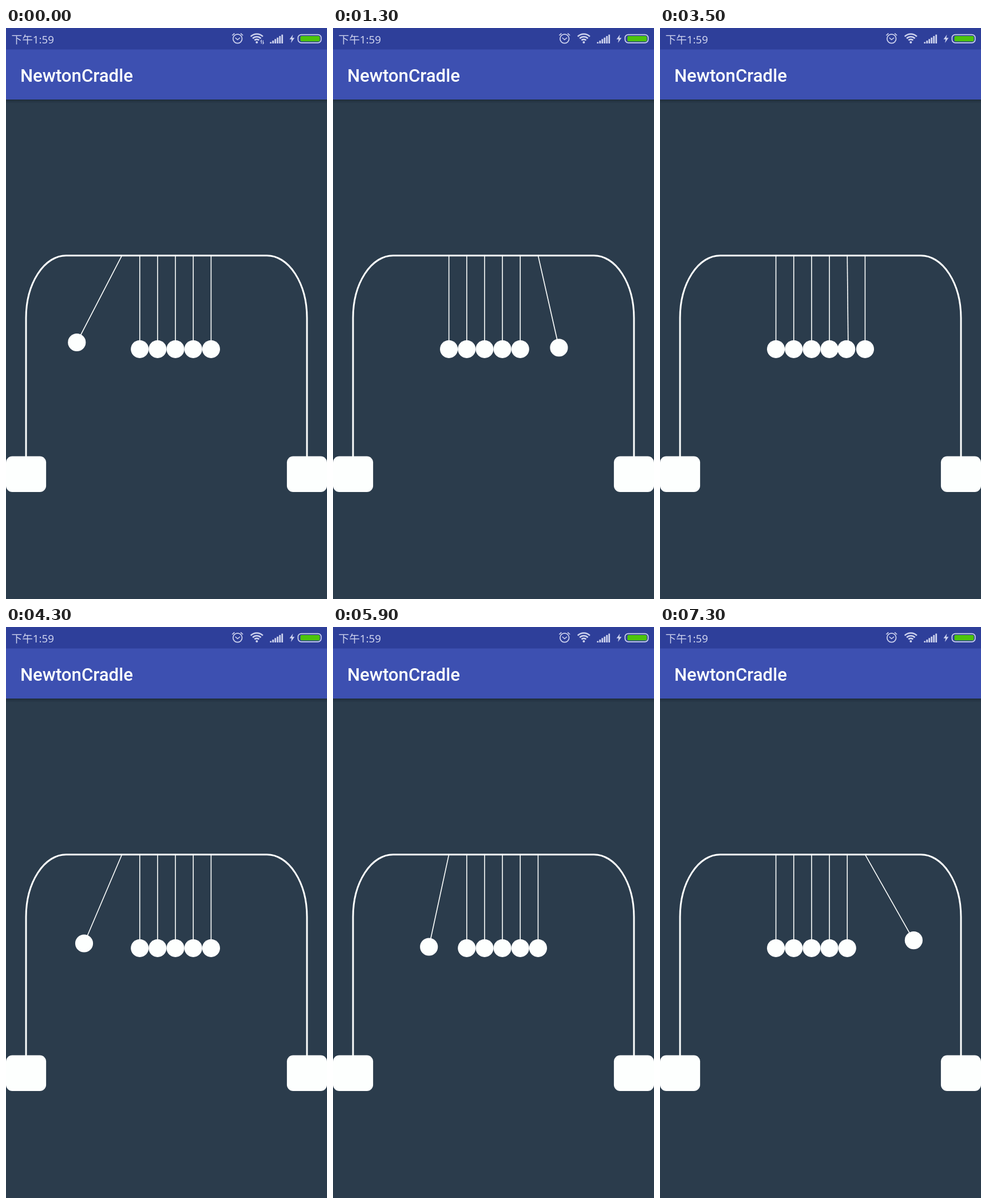
Write an HTML page with a canvas that moves like this. It is 561 px wide and 998 px high and loops after 7400 ms.

```html
<!DOCTYPE html>
<html lang="en">
<head>
<meta charset="utf-8">
<title>Cradle</title>
<style>
html, body { margin: 0; width: 100%; height: 100%; overflow: hidden; background: #2b3c4c; }
canvas { display: block; width: 561px; height: 998px; }
</style>
</head>
<body>
<canvas id="stage" width="561" height="998"></canvas>
<script>
const W = 561, H = 998, LOOP = 7400, STEP = 100;
const ctx = document.getElementById('stage').getContext('2d');

const BAR_Y = 397.7, BALL_Y = 561.3, RADIUS = 15.6, GAP = W / 18, COUNT = 6;
const REACH = W / 6, LIFT = 16.6;
const SWING = 1200, PERIOD = 2713, FIRST = 1037, NUDGE = 78;
const WHITE = '#fdfffe', PALE = '#ced3ee';

function line(points, color, width) {
  ctx.beginPath();
  points.forEach(([x, y]) => ctx.lineTo(x, y));
  ctx.strokeStyle = color;
  ctx.lineWidth = width;
  ctx.stroke();
}

function disc(x, y, r, color) {
  ctx.beginPath();
  ctx.arc(x, y, r, 0, Math.PI * 2);
  ctx.fillStyle = color;
  ctx.fill();
}

function box(x, y, w, h, r, color) {
  ctx.beginPath();
  ctx.roundRect(x, y, w, h, r);
  ctx.fillStyle = color;
  ctx.fill();
}

function arc(x, y, r, from, to, width) {
  ctx.beginPath();
  ctx.arc(x, y, r, from * Math.PI, to * Math.PI);
  ctx.strokeStyle = PALE;
  ctx.lineWidth = width;
  ctx.stroke();
}

function text(str, x, y, font, color) {
  ctx.font = font;
  ctx.fillStyle = color;
  ctx.fillText(str, x, y);
}

function alarm() {
  arc(404.7, 18.7, 7.9, 0, 2, 1.7);
  line([[400.7, 17], [404.7, 20.5], [409, 17]], PALE, 1.6);
  line([[395.3, 13], [399.3, 9.3]], PALE, 1.7);
  line([[410.1, 9.3], [414.1, 13]], PALE, 1.7);
}

function wifi(busy) {
  for (const r of [15, 10.2, 5.6]) arc(438.3, 25.5, r, 1.25, 1.75, 2.6);
  disc(438.3, 25, 2, PALE);
  if (!busy) return;
  line([[446.3, 27.5], [446.3, 21.5], [444.8, 23.5]], PALE, 1.2);
  line([[449.3, 21.5], [449.3, 27.5], [450.8, 25.5]], PALE, 1.2);
}

function signal() {
  for (let i = 0; i < 6; i++) {
    const h = 2.5 + i * 2.6;
    box(461.3 + i * 4, 27 - h, 2.8, h, 0.5, PALE);
  }
}

function battery() {
  ctx.beginPath();
  [[501.5, 11.5], [495.5, 19.8], [499.2, 19.8], [498, 26], [504.3, 17.3], [500.3, 17.3]]
    .forEach(([x, y]) => ctx.lineTo(x, y));
  ctx.fillStyle = PALE;
  ctx.fill();
  ctx.beginPath();
  ctx.roundRect(510.4, 11.6, 40.4, 14.2, 5.5);
  ctx.strokeStyle = PALE;
  ctx.lineWidth = 1.7;
  ctx.stroke();
  box(514.5, 14, 34, 9.5, 2, '#4cc40c');
}

function header(t) {
  const shade = ctx.createLinearGradient(0, 124, 0, 132);
  shade.addColorStop(0, 'rgba(10,20,30,0.4)');
  shade.addColorStop(1, 'rgba(10,20,30,0)');
  ctx.fillStyle = shade;
  ctx.fillRect(0, 124, W, 8);
  box(0, 0, W, 125, 0, '#3d50b1');
  box(0, 0, W, 37.5, 0, '#2e3f9a');
  text('下午1:59', 9.5, 26.6, '18.7px "Noto Sans", "Noto Sans CJK SC", "Noto Sans CJK", sans-serif', PALE);
  text('NewtonCradle', 24.9, 93.6, '500 31.17px Roboto, sans-serif', WHITE);
  alarm();
  wifi(t < 800);
  signal();
  battery();
}

function stand() {
  ctx.beginPath();
  ctx.moveTo(35, 750);
  ctx.lineTo(35, 507);
  ctx.ellipse(105, 507, 70, 507 - BAR_Y, 0, Math.PI, Math.PI * 1.5);
  ctx.ellipse(456, 507, 70, 507 - BAR_Y, 0, Math.PI * 1.5, Math.PI * 2);
  ctx.lineTo(526, 750);
  ctx.strokeStyle = WHITE;
  ctx.lineWidth = 3;
  ctx.stroke();
  box(0, 748.5, 70.1, 62.4, 11, WHITE);
  box(W - 70.1, 748.5, 70.1, 62.4, 11, WHITE);
}

// Outer balls take turns swinging; between turns a nudge runs through the inner four.
function pose(t) {
  const turn = Math.floor((t - FIRST) / PERIOD);
  const local = t - FIRST - turn * PERIOD;
  const right = turn % 2 === 0;
  const dir = right ? 1 : -1;
  if (local < 2 * SWING) {
    const u = local / SWING - 1;
    const d = 1 - u * u;
    return { ball: right ? COUNT - 1 : 0, dx: dir * REACH * d, dy: -LIFT * d * d };
  }
  const slot = Math.min(3, Math.floor((local - 2 * SWING) / NUDGE));
  return { ball: right ? 4 - slot : 1 + slot, dx: -dir * 1.5, dy: 0, rope: dir * 1.7 };
}

function cradle(t) {
  const { ball, dx, dy, rope = dx } = pose(t);
  for (let i = 0; i < COUNT; i++) {
    const x = W / 2 + (i - 2.5) * GAP;
    const on = i === ball ? 1 : 0;
    const y = BALL_Y + on * dy;
    line([[x, BAR_Y], [x + on * rope, y]], WHITE, 1.6);
    disc(x + on * dx, y, RADIUS, WHITE);
  }
}

function draw(now) {
  const t = Math.floor((now % LOOP) / STEP) * STEP;
  box(0, 0, W, H, 0, '#2b3c4c');
  header(t);
  stand();
  cradle(t);
}

let start;
function tick(now) {
  start ??= now;
  draw(now - start);
  requestAnimationFrame(tick);
}
draw(0);
requestAnimationFrame(tick);
</script>
</body>
</html>
```
